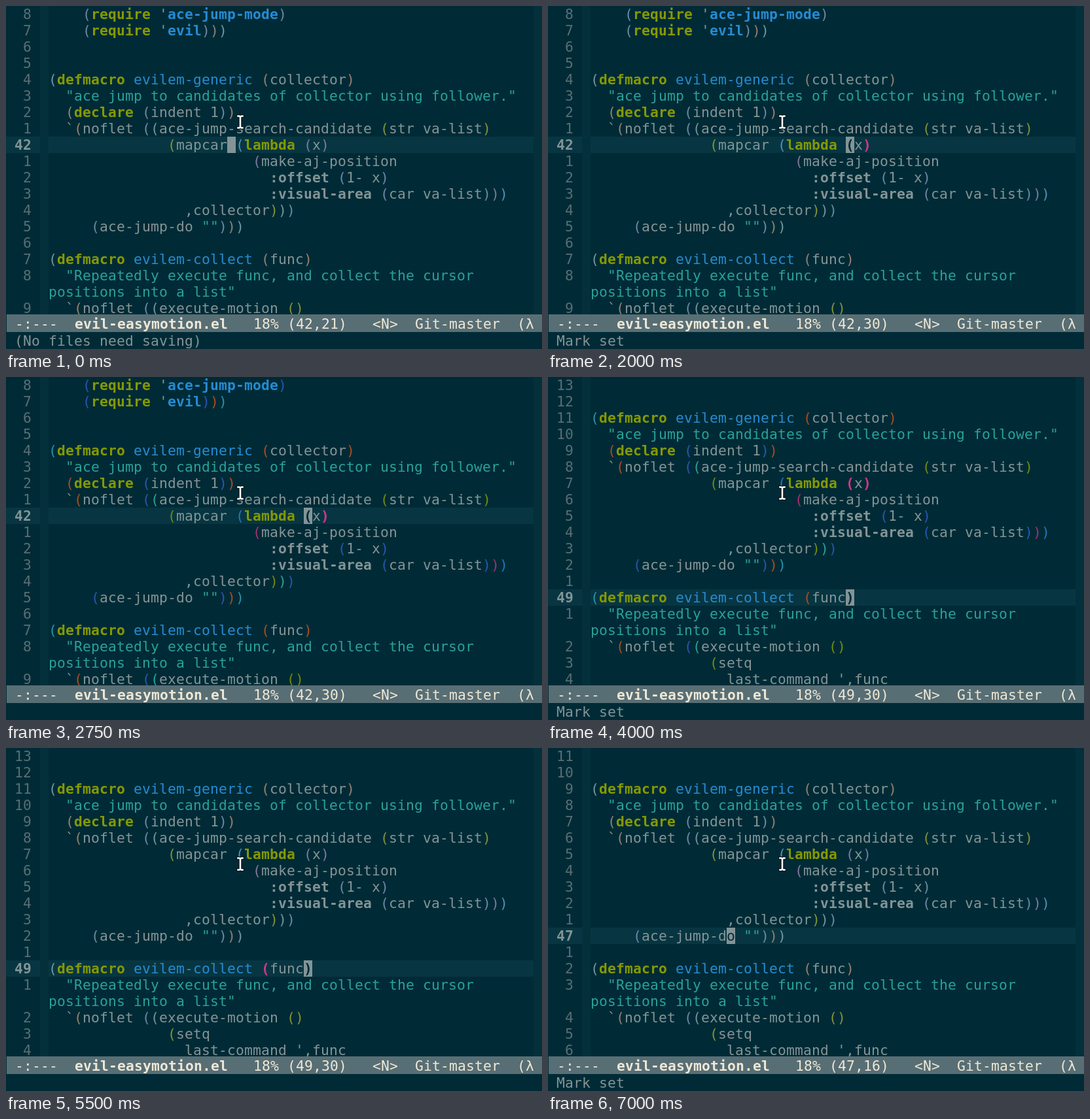
An HTML page that plays this animation: 819x525 px, repeating every 8 s.

```html
<!DOCTYPE html>
<html lang="en">
<head>
<meta charset="utf-8">
<title>Jump motions in an editor</title>
<style>
  html, body { margin: 0; width: 100%; height: 100%; overflow: hidden; background: #002b36; }
  svg { display: block; width: 819px; height: 525px; }
  /* 16pt type on a 13px character grid */
  text { font: 16pt "DejaVu Sans Mono", monospace; letter-spacing: calc(13px - 1ch); white-space: pre; }
  .bold { font-weight: bold; }
  .scene { visibility: hidden; }
  .scene.on { visibility: visible; }
</style>
</head>
<body>
<svg id="stage" viewBox="0 0 819 525"></svg>
<script>
const CELL = 13, ROW = 25, LEFT = 65, ROWS = 19, FIRST_LINE = 34, WRAPPED = 17, LOOP = 8000;
const C = {
  bg: '#002b36', line: '#073642', fringe: '#03303b', dim: '#586e75', base: '#839496',
  light: '#eee8d5', red: '#dc322f', green: '#859900', blue: '#268bd2', cyan: '#2aa198', magenta: '#d33682'
};
// Parenthesis colours by nesting depth
const MUTED = ['#6f98a0', '#94806f', '#6d88a4', '#7393a0', '#82933a', '#5490b8', '#80789f', '#6d88a4'];
const VIVID = ['#2793a8', '#a94c20', '#2a55b0', '#2aa198', '#718c0c', '#2774c4', '#a52f72', '#2a55b0'];

const BUFFER = [
  "    (require 'ace-jump-mode)",
  "    (require 'evil)))",
  '',
  '',
  '(defmacro evilem-generic (collector)',
  '  "ace jump to candidates of collector using follower."',
  '  (declare (indent 1))',
  '  `(noflet ((ace-jump-search-candidate (str va-list)',
  '              (mapcar (lambda (x)',
  '                        (make-aj-position',
  '                          :offset (1- x)',
  '                          :visual-area (car va-list)))',
  '                ,collector)))',
  '     (ace-jump-do "")))',
  '',
  '(defmacro evilem-collect (func)',
  '  "Repeatedly execute func, and collect the cursor',
  'positions into a list"',
  '  `(noflet ((execute-motion ()',
  '              (setq',
  "                last-command ',func"
];
const RULES = [
  [/\b(require|defmacro|declare|lambda)\b/g, C.green, true],
  [/(?<=defmacro )[\w-]+/g, C.blue, false],
  [/(?<=')[a-z-]+/g, C.blue, true],
  [/:[\w-]+/g, C.base, true]
];

function highlight() {
  let depth = 2, quoted = false;
  return BUFFER.map(line => {
    const cells = [...line].map(ch => ({ ch, fill: C.base, bold: false }));
    for (const [pattern, fill, bold] of RULES)
      for (const m of line.matchAll(pattern))
        for (let i = 0; i < m[0].length; i++) Object.assign(cells[m.index + i], { fill, bold });
    for (const cell of cells) {
      const edge = cell.ch === '"';
      if (edge || quoted) Object.assign(cell, { fill: C.cyan, bold: false });
      if (edge) quoted = !quoted;
      else if (!quoted && cell.ch === '(') cell.depth = depth++;
      else if (!quoted && cell.ch === ')') cell.depth = --depth;
    }
    return cells;
  });
}
const STYLED = highlight();

const KEYS = 'abcdefghijklmnopqrstuvwxyz0123456789ABCDEFGHIJKLMNOPQRSTUVWXYZ';
const label = spots => new Map(spots.slice(0, KEYS.length).map(([r, c], i) => [r + ',' + c, KEYS[i]]));
const words = (line, r) => [...line.matchAll(/\w+|[^\w\s]+|^$/g)]
  .map(m => ({ r, start: m.index, end: m.index + Math.max(m[0].length - 1, 0) }));
const TOKENS = BUFFER.flatMap(words);

const MOTIONS = {
  forward: ([r, c]) => label(TOKENS.filter(t => t.r > r || (t.r === r && t.start > c)).map(t => [t.r, t.start])),
  backward: ([r, c]) => label(TOKENS.filter(t => t.r < r || (t.r === r && t.end < c)).reverse().map(t => [t.r, t.end])),
  down: ([r, c]) => label(BUFFER.map((line, i) => [i, Math.min(c, line.length)]).slice(r + 1, WRAPPED + 1))
};

const rect = (x, y, w, h, fill) => `<rect x="${x}" y="${y}" width="${w}" height="${h}" fill="${fill}"/>`;
const escape = s => s.replace(/&/g, '&amp;').replace(/</g, '&lt;');
const text = (x, y, s, fill, bold) =>
  s.trim() ? `<text x="${x}" y="${y}" fill="${fill}"${bold ? ' class="bold"' : ''}>${escape(s)}</text>` : '';

// Neighbouring cells of one style become one text element
function drawCells(cells, y) {
  let out = '', start = 0;
  for (let i = 1; i <= cells.length; i++) {
    const a = cells[start], b = cells[i];
    if (b && a.fill === b.fill && a.bold === b.bold) continue;
    const run = cells.slice(start, i).map(c => c.ch).join('');
    const pad = run.length - run.trimStart().length;
    out += text(LEFT + (start + pad) * CELL, y, run.trim(), a.fill, a.bold);
    start = i;
  }
  return out;
}

const lineNumber = r => FIRST_LINE + r - (r > WRAPPED ? 1 : 0);

function drawRow(r, s, labels) {
  const top = (r - s.top) * ROW, y = top + 20;
  const [cr, cc] = s.cursor, current = r === cr;
  const cells = STYLED[r].map(({ ch, fill, bold, depth }) => ({
    ch, bold, fill: s.motion ? C.dim : depth === undefined ? fill : (s.vivid ? VIVID : MUTED)[depth]
  }));
  for (const [pr, pc] of s.match || [])
    if (pr === r) Object.assign(cells[pc], { fill: C.magenta, bold: true });
  for (let c = 0; c <= BUFFER[r].length; c++) {
    const key = labels.get(r + ',' + c);
    if (key) cells[c] = { ch: key, fill: C.red, bold: true };
  }
  let out = '';
  if (current) {
    out += rect(0, top, 52, ROW, C.line);
    if (!s.motion) out += rect(LEFT, top, 741, ROW, C.line);
    out += rect(LEFT + cc * CELL, top, CELL, ROW, C.base);
    cells[cc].fill = C.bg;
    if (s.match) cells[cc].bold = true;
  }
  if (r !== WRAPPED) {
    const n = String(current ? lineNumber(r) : Math.abs(lineNumber(r) - lineNumber(cr)));
    out += text(39 - n.length * CELL, y, n, current ? C.base : C.dim, current || labels.has(r + ',0'));
  }
  return out + drawCells(cells, y);
}

function drawScene(s) {
  const labels = s.motion ? MOTIONS[s.motion](s.cursor) : new Map();
  const [cr, cc] = s.cursor;
  let out = '';
  for (let i = 0; i < ROWS; i++) out += drawRow(s.top + i, s, labels);
  out += rect(0, 472, 819, 53, C.bg) + rect(1, 472, 818, 27, C.dim);
  out += text(14, 494, '-:---', C.light) + text(105, 494, 'evil-easymotion.el', C.light, true);
  out += text(378, 494, `18% (${lineNumber(cr)},${cc})   <N>  Git-master  ${s.motion ? '[' : ''}(λ`, C.light);
  return `<g class="scene">${out}${text(13, 520, s.message || '', C.base)}</g>`;
}

const start = { top: 0, cursor: [8, 21] };
const onArg = { top: 0, cursor: [8, 30], match: [[8, 32]] };
const onFunc = { top: 2, cursor: [15, 30], match: [[15, 25]] };
const message = 'Mark set';
const SCENES = [
  { at: 0, ...start, message: '(No files need saving)' },
  { at: 500, ...start, motion: 'forward' },
  { at: 2000, ...onArg, message },
  { at: 2500, ...onArg, message, vivid: true },
  { at: 2750, ...onArg, vivid: true },
  { at: 3000, ...onArg, motion: 'down' },
  { at: 4000, ...onFunc, message, vivid: true, match: [[8, 30], [8, 32]] },
  { at: 4250, ...onFunc, message },
  { at: 5500, ...onFunc },
  { at: 6000, ...onFunc, motion: 'backward' },
  { at: 7000, top: 2, cursor: [13, 16], message }
];

const beam = 'M354.500 168.500h2l1.500 1.500l1.500-1.500h2M358 170v15M354.500 186.500h2l1.500-1.500l1.500 1.500h2';
const pointer = `<g fill="none" stroke-linecap="square"><path d="${beam}" stroke="#001218" stroke-width="5"/>
  <path d="${beam}" stroke="#fff" stroke-width="2.600"/></g>`;

const stage = document.getElementById('stage');
stage.innerHTML = rect(0, 0, 819, 525, C.bg) + rect(52, 0, 13, 472, C.fringe) + rect(806, 0, 13, 472, C.fringe)
  + SCENES.map(drawScene).join('') + pointer;

const groups = [...stage.querySelectorAll('.scene')];
const origin = performance.now();
let shown = -1;
function tick() {
  const t = (performance.now() - origin) % LOOP;
  const now = SCENES.findLastIndex(s => s.at <= t);
  if (now !== shown) {
    groups.forEach((g, i) => g.classList.toggle('on', i === now));
    shown = now;
  }
  requestAnimationFrame(tick);
}
tick();
</script>
</body>
</html>
```
